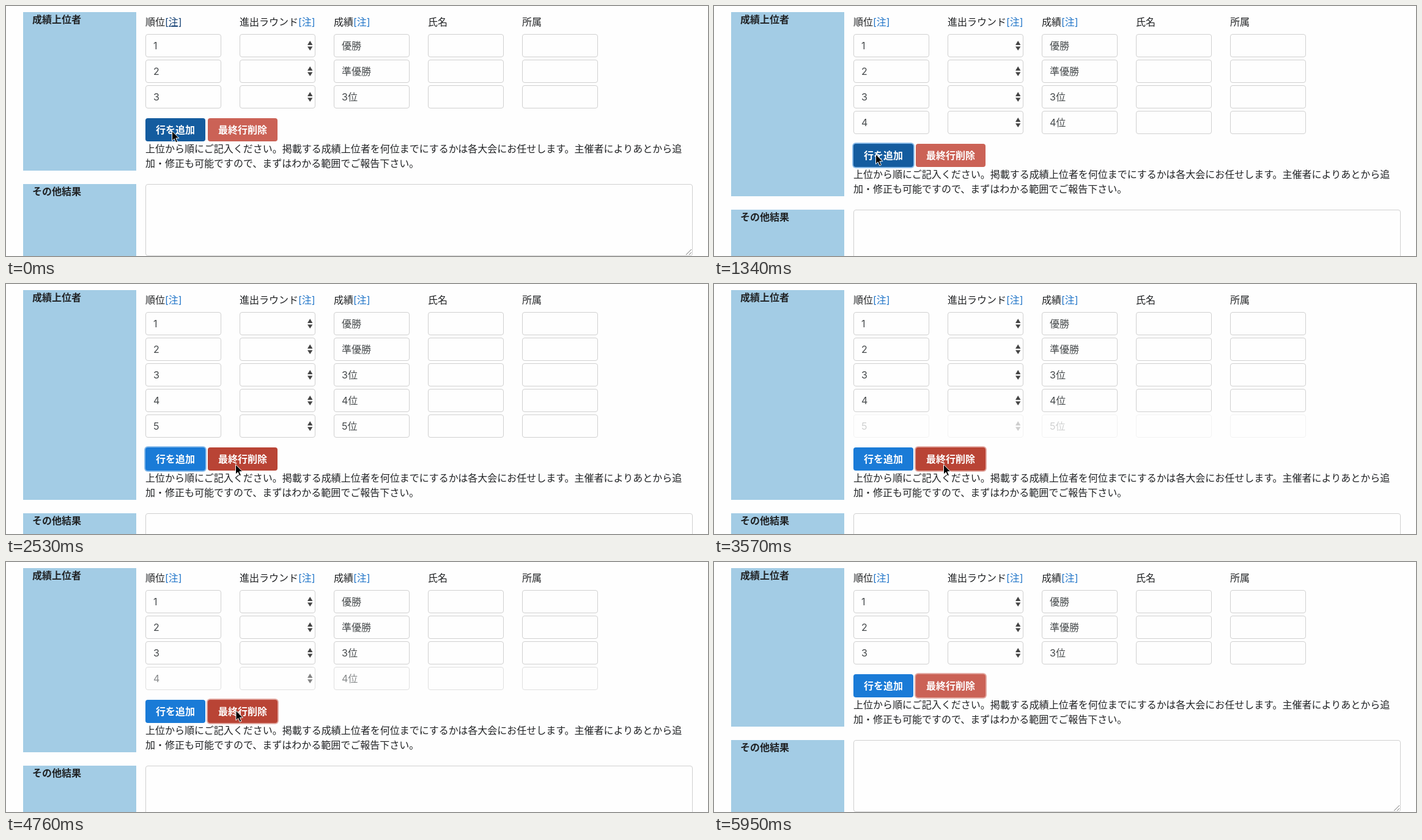
Recreate the animation shown at these times as an HTML page. Size 1148 by 410 pixels, loop 6250 ms.

```html
<!DOCTYPE html>
<html lang="ja">
<head>
<meta charset="utf-8">
<style>
html, body { margin: 0; width: 100%; height: 100%; overflow: hidden; }
body {
  position: relative; background: #fefefe; color: #202224;
  font: 16px/24px Inter, "Noto Sans CJK JP", "Noto Sans CJK", sans-serif;
}
div, svg { position: absolute; box-sizing: border-box; white-space: nowrap; }
.side { left: 28px; width: 185px; padding-left: 15px; background: #a3cce5; font-weight: bold; }
.link { color: #1f74c8; }
.link.hover { color: #123f73; text-decoration: underline; }
.field, #other { border: 1px solid #d0d0d0; border-radius: 4px; }
.field { width: 124px; height: 38px; padding-left: 12px; line-height: 36px; color: #464a4c; }
.field svg { left: 110px; top: 10px; }
#other { left: 228px; top: 292px; width: 895px; height: 118px; }
.button {
  top: 184px; height: 38px; padding-left: 17px; border-radius: 4px;
  color: #fff; font-weight: bold; line-height: 38px;
  background: color-mix(in srgb, var(--dark) calc(var(--hover) * 100%), var(--light));
  box-shadow: 0 0 0 calc(var(--ring) * 1px) var(--glow);
}
#add { left: 228px; width: 98px; --light: #1a7bd7; --dark: #145c9f; --glow: #8cbdea; }
#del { left: 330px; width: 114px; --light: #cb6256; --dark: #b94435; --glow: #e3aaa3; }
#cursor { left: 0; top: 0; overflow: visible; }
</style>
</head>
<body>
<div class="side" id="upper" style="top:10px">成績上位者</div>
<div id="table"></div>
<div id="lower">
  <div class="button" id="add">行を追加</div>
  <div class="button" id="del">最終行削除</div>
  <div style="left:228px;top:222px">上位から順にご記入ください。掲載する成績上位者を何位までにするかは各大会にお任せします。主催者によりあとから追<br>加・修正も可能ですので、まずはわかる範囲でご報告下さい。</div>
  <div class="side" style="top:292px;height:160px">その他結果</div>
  <div id="other"><svg width="9" height="9" style="right:1px;bottom:1px"><path d="M0 9 9 0M5 9 9 5" stroke="#777"/></svg></div>
</div>
<svg id="cursor" width="1" height="1">
  <path id="arrow" d="M0 0V16.2L3.7 12.7 6.3 18.8 9 17.6 6.4 11.7H11.4Z" stroke="#fff"/>
  <path id="beam" d="M-3.5-7.5Q0-7.5 0-5Q0-7.5 3.5-7.5M0-5V5M-3.5 7.5Q0 7.5 0 5Q0 7.5 3.5 7.5M-2 3H2" fill="none" stroke="#222" stroke-width="1.2"/>
</svg>
<script>
const LOOP = 6250, PITCH = 42;
const $ = id => document.getElementById(id);
const columns = [228, 382, 536, 690, 844];
const results = ['優勝', '準優勝', '3位', '4位', '5位'];
const spinner = '<svg width="9" height="16"><path d="M0 7 4.2 0 8.4 7ZM0 9.5H8.4L4.2 16Z" fill="#444"/></svg>';

const note = '<span class="link">[注]</span>';
$('table').innerHTML = ['順位' + note, '進出ラウンド' + note, '成績' + note, '氏名', '所属']
  .map((text, i) => `<div style="left:${columns[i]}px;top:14px">${text}</div>`).join('');
const firstLink = document.querySelector('.link');

const rows = results.map((result, n) => {
  const row = document.createElement('div');
  row.style.top = 46 + PITCH * n + 'px';
  row.innerHTML = [n + 1, spinner, result, '', '']
    .map((text, i) => `<div class="field" style="left:${columns[i]}px">${text}</div>`).join('');
  $('table').append(row);
  return row;
});

const arrow = (x, y) => ({ shape: 'arrow', x, y });
const beam = (x, y) => ({ shape: 'beam', x, y });

// Each step lists only what changes at its time.
const steps = [
  { t: 0, rows: 3, fade: 1, link: true, addHover: 1, delHover: 0, addRing: 0, delRing: 0, cursor: arrow(271.5, 205) },
  { t: 450, link: false, addRing: 1 },
  { t: 600, rows: 4, addRing: 2, cursor: beam(272, 207) },
  { t: 1190, addHover: .5, cursor: arrow(264.5, 243) },
  { t: 1340, addHover: 1 },
  { t: 1640, rows: 5, cursor: beam(266, 245) },
  { t: 2080, cursor: beam(297, 263.5) },
  { t: 2230, addHover: .5, cursor: arrow(346, 298) },
  { t: 2380, addHover: 0, cursor: arrow(373, 300) },
  { t: 2530, delHover: 1, cursor: arrow(375.5, 296) },
  { t: 3420, addRing: 1, delRing: 1 },
  { t: 3570, addRing: 0, delRing: 2, fade: .25 },
  { t: 3720, rows: 4, fade: 1, cursor: beam(376, 298) },
  { t: 4170, delHover: .5, cursor: arrow(376, 264) },
  { t: 4310, delHover: 1, cursor: arrow(376, 243.5) },
  { t: 4760, fade: .65 },
  { t: 4910, rows: 3, fade: 1 },
  { t: 5360, cursor: beam(292.5, 112) },
  { t: 5500, delHover: .5, cursor: beam(853.5, 350) },
  { t: 5650, delHover: 0, cursor: beam(889.5, 362) },
  { t: 5800, cursor: beam(1051.5, 410) },
  { t: 5950, cursor: { shape: '', x: 0, y: 0 } },
];

function draw(s) {
  const shift = PITCH * (s.rows - 3);
  $('upper').style.height = 260 + shift + 'px';
  $('lower').style.transform = `translateY(${shift}px)`;
  firstLink.classList.toggle('hover', s.link);
  rows.forEach((row, n) => {
    row.style.display = n < s.rows ? '' : 'none';
    row.style.opacity = n === s.rows - 1 ? s.fade : 1;
  });
  for (const id of ['add', 'del']) {
    $(id).style.setProperty('--hover', s[id + 'Hover']);
    $(id).style.setProperty('--ring', s[id + 'Ring']);
  }
  for (const id of ['arrow', 'beam']) $(id).style.display = id === s.cursor.shape ? '' : 'none';
  $('cursor').style.transform = `translate(${s.cursor.x}px, ${s.cursor.y}px)`;
}

let shown;
function tick() {
  const t = performance.now() % LOOP;
  const past = steps.filter(step => step.t <= t);
  if (past.length !== shown) {
    shown = past.length;
    draw(Object.assign({}, ...past));
  }
  requestAnimationFrame(tick);
}
tick();
</script>
</body>
</html>
```
